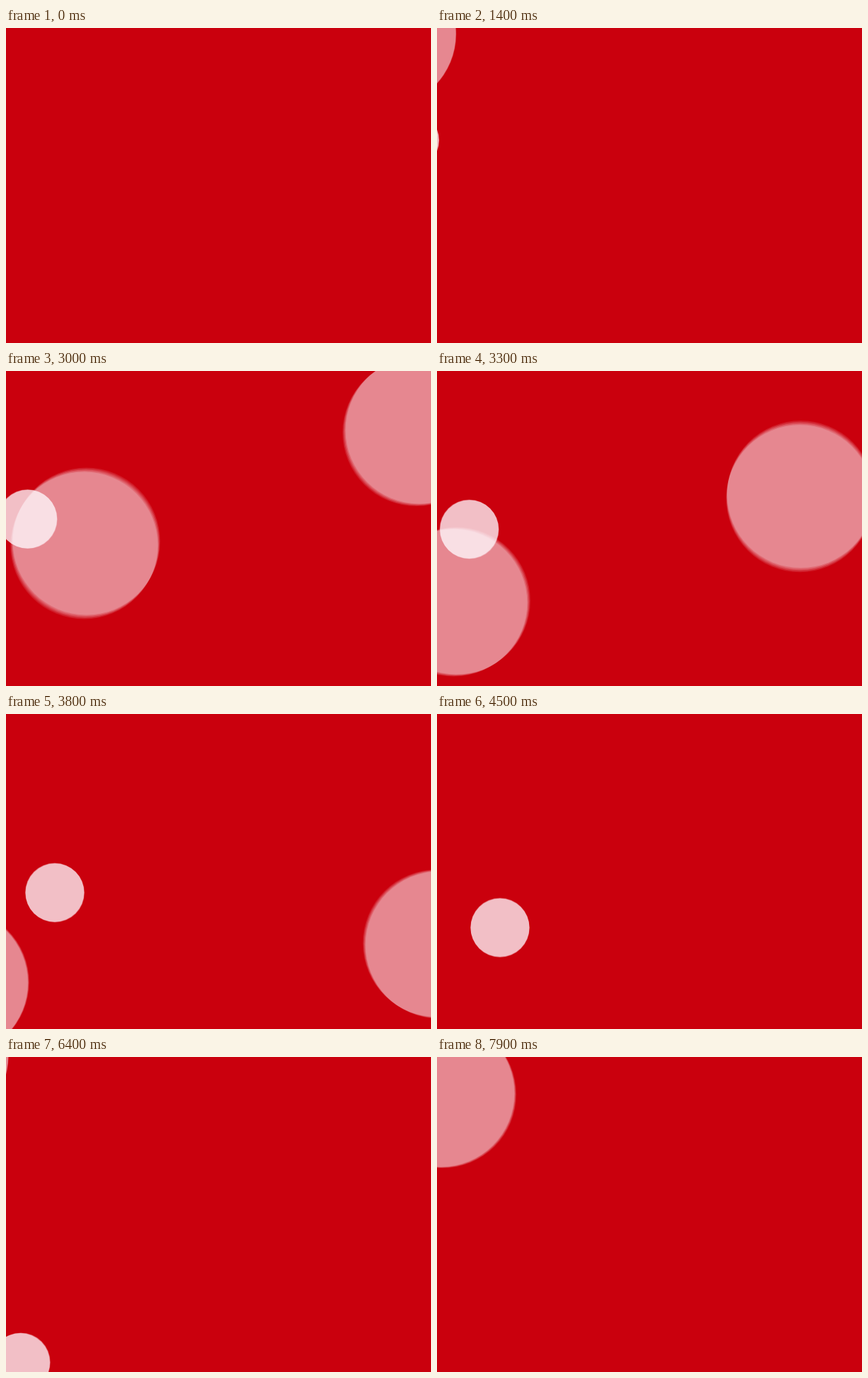
These frames come from a looping animation (600x445 px, 8 s). An HTML page with a canvas:

```html
<!DOCTYPE html>
<html lang="en">
<head>
<meta charset="utf-8">
<title>Drifting circles</title>
<style>
  html, body { margin: 0; width: 100%; height: 100%; overflow: hidden; background: #ca000d; }
  canvas { display: block; width: 600px; height: 445px; }
</style>
</head>
<body>
<canvas id="stage" width="600" height="445"></canvas>
<script>
const W = 600, H = 445, LOOP = 8000, STEP = 100;
const SHUTTER = 16, SAMPLES = 5;

// Each circle sweeps down a sideways parabola: slow in, fast in the middle, slow out.
// tip: turning point, bend: curvature, mid: time and height of top speed,
// reach and pace: scale of the easing in pixels and ms.
const left = {
  r: 104, alpha: 0.54, tip: { x: 125.7, y: 195 }, bend: -0.00583,
  mid: { t: 2900, y: 205 }, reach: 148.3, pace: 376
};
const leftAgain = { ...left, mid: { t: left.mid.t + 5628, y: left.mid.y } };
const right = {
  r: 104, alpha: 0.54, tip: { x: 511, y: 195 }, bend: 0.00583,
  mid: { t: 3346, y: 195 }, reach: 150, pace: 385
};
const small = {
  r: 41.6, alpha: 0.765, tip: { x: 90, y: 316 }, bend: -0.0052,
  mid: { t: 4800, y: 325 }, reach: 163.5, pace: 2100
};
const circles = [left, leftAgain, right, small];

function makeContext(canvas) {
  canvas.width = W;
  canvas.height = H;
  return canvas.getContext('2d');
}

const ctx = makeContext(document.getElementById('stage'));
const layerCtx = makeContext(document.createElement('canvas'));
layerCtx.fillStyle = '#fdf8ff';

function position({ tip, bend, mid, reach, pace }, t) {
  const y = mid.y + reach * Math.atan((t - mid.t) / pace);
  return { x: tip.x + bend * (y - tip.y) ** 2, y };
}

// Averages a few moments around t for a soft motion blur
function drawCircle(circle, t) {
  layerCtx.clearRect(0, 0, W, H);
  layerCtx.globalCompositeOperation = 'lighter';
  layerCtx.globalAlpha = 1 / SAMPLES;
  for (let i = 0; i < SAMPLES; i++) {
    const { x, y } = position(circle, t + SHUTTER * (i / (SAMPLES - 1) - 0.5));
    layerCtx.beginPath();
    layerCtx.arc(x, y, circle.r, 0, 2 * Math.PI);
    layerCtx.fill();
  }
  ctx.globalAlpha = circle.alpha;
  ctx.drawImage(layerCtx.canvas, 0, 0);
}

function render(now) {
  const t = Math.floor((now % LOOP) / STEP) * STEP;
  ctx.globalAlpha = 1;
  ctx.fillStyle = '#ca000d';
  ctx.fillRect(0, 0, W, H);
  circles.forEach(circle => drawCircle(circle, t));
}

const start = performance.now();
function tick() {
  render(performance.now() - start);
  requestAnimationFrame(tick);
}
tick();
</script>
</body>
</html>
```
